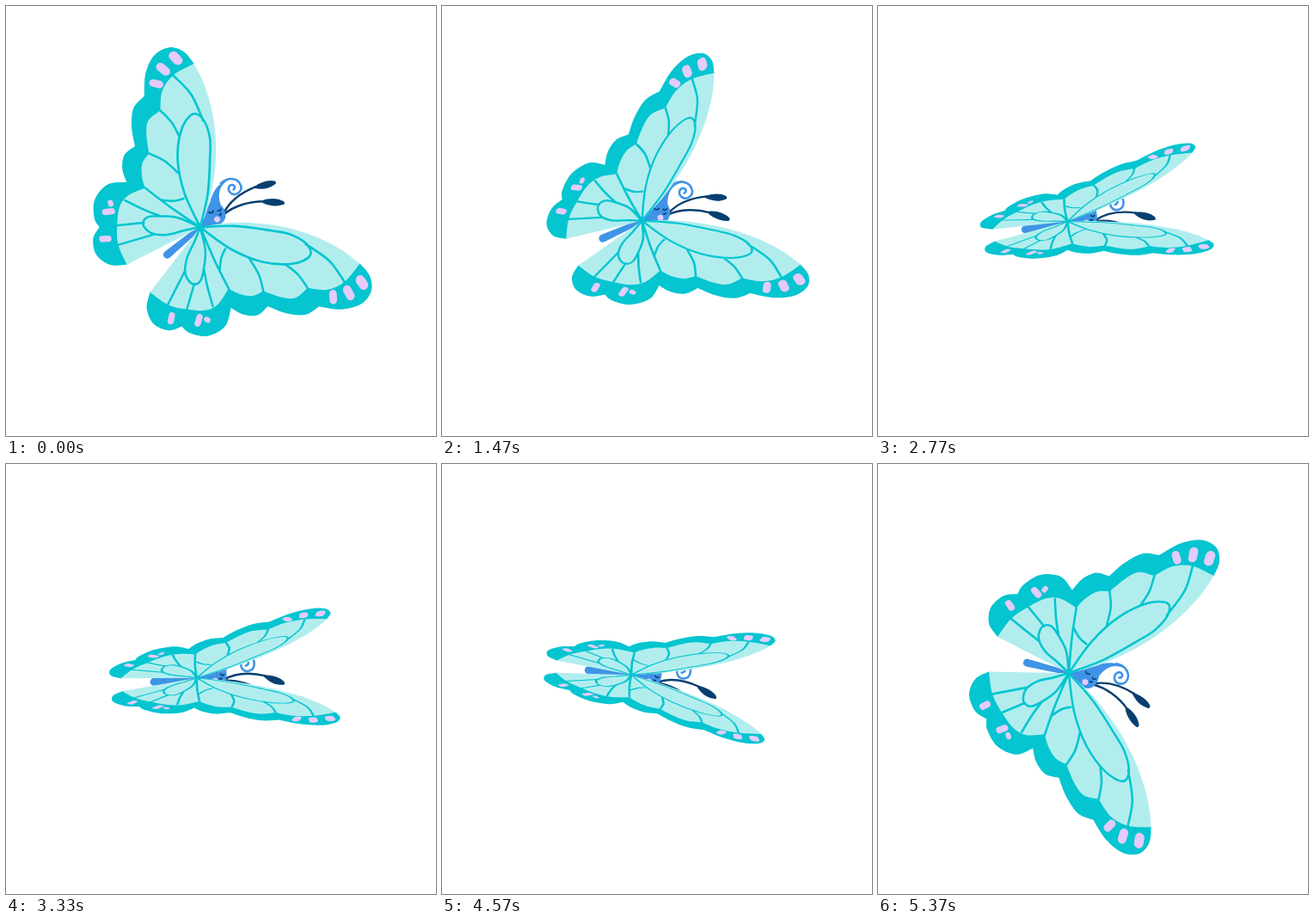
An HTML page for the animation above (5.41 s loop, 500x500 px).

```html
<!DOCTYPE html>
<html lang="en">
<head>
<meta charset="utf-8">
<title>Butterfly</title>
<style>
  html, body { margin: 0; width: 100%; height: 100%; overflow: hidden; background: #fff; }
  svg { display: block; width: 100vw; height: 100vh; }
  .line { fill: none; stroke-linecap: round; stroke-linejoin: round; }
</style>
</head>
<body>
<svg viewBox="0 0 500 500">
  <g id="butterfly">
    <g id="body">
      <g class="line" stroke="#073f70" stroke-width="2.4">
        <path d="M31 5C44 -1 62 -1 80 5"/>
        <path d="M31 6C46 6 63 13 76 24"/>
      </g>
      <g fill="#073f70">
        <path d="M78 4C86 4 97 8 101 14Q102 18 98 17C90 17 83 12 78 6Z"/>
        <path d="M75 22C83 24 92 32 94 39Q94 43 90 41C83 38 77 31 74 25Z"/>
      </g>
      <g fill="#3f94e6">
        <path d="M0 -2.5L-50 -4.5A4.5 4.5 0 0 0 -50 4.5L0 2.5Z"/>
        <path d="M0 -2C12 -4 18 -11 27 -15C38 -23 50 -27 61 -21C50 -24 40 -18 35 -5C36 8 28 14 20 12C12 10 7 5 0 3Z"/>
      </g>
      <path class="line" stroke="#3f94e6" stroke-width="2.6"
        d="M51 -24C62 -25 69 -17 68 -10C67 -1 56 0 53 -7C51 -14 58 -18 61 -13C62 -11 60 -9 58 -9"/>
      <g class="line" stroke="#073f70" stroke-width="1.6">
        <path d="M19 -7Q20 -3 24 -5"/>
        <path d="M28 -2Q29 1 32 -1"/>
        <path d="M26 3Q28 5 29 3"/>
      </g>
      <circle cx="21" cy="5.5" r="3.4" fill="#e3cbfa"/>
    </g>
    <g id="left"></g>
    <g id="right"></g>
  </g>
</svg>
<script>
const LOOP = 5410;
const TEAL = '#04c5d0', PALE = '#b2edee', PINK = '#e3cbfa';
const $ = id => document.getElementById(id);

// Smooth curve through points, continuing a path that stands at the first one.
function through(pts) {
  const at = i => pts[Math.max(0, Math.min(pts.length - 1, i))];
  let d = '';
  for (let i = 0; i < pts.length - 1; i++) {
    const [a, b, c, e] = [at(i - 1), at(i), at(i + 1), at(i + 2)];
    const c1 = [0, 1].map(k => (b[k] + (c[k] - a[k]) / 6).toFixed(1));
    const c2 = [0, 1].map(k => (c[k] - (e[k] - b[k]) / 6).toFixed(1));
    d += `C${c1} ${c2} ${c}`;
  }
  return d;
}
const chain = arcs => arcs.map(through).join('');
const curve = pts => `M${pts[0]}${through(pts)}`;

// Wing coordinates: x runs towards the head, y away from the body.
const tip = [126, 151], heel = [-92, 21];
const border = [
  [tip, [127, 169], [118, 184], [99, 188], [77, 178], [58, 159]],
  [[58, 159], [39, 156], [22, 140], [10, 121]],
  [[10, 121], [-6, 121], [-19, 110], [-26, 95]],
  [[-26, 95], [-44, 107], [-67, 103], [-82, 87], [-85, 75]],
  [[-85, 75], [-100, 69], [-110, 52], [-106, 33], heel]
];
const membrane = [
  [[0, 0], [31, 18], [59, 41], [81, 64], [102, 93], [118, 125], tip],
  [tip, [99, 156], [77, 150], [60, 134]],
  [[60, 134], [42, 134], [29, 123], [16, 104]],
  [[16, 104], [2, 100], [-9, 88], [-15, 76]],
  [[-15, 76], [-36, 82], [-52, 78], [-68, 64], [-83, 46], heel]
];
const veins = [
  [[0, 0], [14, 42], [35, 77], [62, 101], [84, 107], [89, 94], [80, 73], [65, 56], [34, 25], [0, 0]],
  [[88, 93], [99, 126], [99, 156]],
  [[60, 134], [60, 115], [55, 96]],
  [[16, 104], [23, 86], [25, 65]],
  [[-15, 76], [-9, 40], [0, 0]],
  [[-11, 53], [-1, 43], [9, 38]],
  [[0, 0], [-10, 23], [-21, 36], [-36, 48], [-46, 45], [-46, 31], [-34, 18], [-16, 9], [0, 0]],
  [[-42, 80], [-34, 59], [-25, 40]],
  [[-68, 63], [-44, 46]],
  [[-83, 45], [-45, 28]]
];
const spots = [
  [[115, 173], [115, 166], 11],
  [[95, 173], [96, 165], 10],
  [[76, 164], [80, 158], 9],
  [[-56, 89], [-57, 87], 6],
  [[-68, 84], [-62, 80], 7.5],
  [[-92, 62], [-87, 58], 7.5]
];

const wing =
  `<path fill="${TEAL}" d="M${tip}${chain(border)}L-40 22L60 80Z"/>` +
  `<path fill="${PALE}" d="M0 0${chain(membrane)}Z"/>` +
  `<path class="line" stroke="${TEAL}" stroke-width="2.6" d="${veins.map(curve).join('')}"/>` +
  spots.map(([a, b, w]) =>
    `<path class="line" stroke="${PINK}" stroke-width="${w}" d="M${a}L${b}"/>`).join('');
$('left').innerHTML = $('right').innerHTML = wing;

function interpolate(keys, x, ease = u => u) {
  let i = 0;
  while (i < keys.length - 2 && x > keys[i + 1][0]) i++;
  const [[x0, y0], [x1, y1]] = [keys[i], keys[i + 1]];
  return y0 + (y1 - y0) * ease((x - x0) / (x1 - x0));
}
const soft = u => u * u * (3 - 2 * u);

// Wing beats completed over time, and the drift along the body within one beat.
const beats = [[0, -0.04], [670, 1.083], [1470, 2.297], [2770, 4.49],
  [3870, 6.4], [4570, 7.5], [5370, 8.776], [5410, 8.85]];
const drift = [[0, -14.5], [0.083, -11], [0.25, -5.5], [0.3, -6], [0.4, -12],
  [0.5, -18], [0.776, -16.7], [0.96, -15.8], [1, -14.5]];

function draw(t) {
  const beat = interpolate(beats, t);
  const phase = beat - Math.floor(beat);
  const fold = (26 - 45 * Math.cos(2 * Math.PI * phase)) * Math.PI / 180;
  const shear = 0.22 * Math.sin(fold);
  const span = 1.05 * Math.cos(fold);
  const turn = -39.7 + t / 100 + 1.3 * Math.sin(Math.PI * t / LOOP) ** 2;
  const shift = interpolate(drift, phase, soft);

  $('butterfly').setAttribute('transform',
    `translate(238 247.2) rotate(${turn}) translate(${shift} 0)`);
  $('left').setAttribute('transform', `matrix(1 0 ${shear} ${-span} 0 0)`);
  $('right').setAttribute('transform', `matrix(1 0 ${shear} ${span} 0 0)`);
}

const start = performance.now();
function tick() {
  draw((performance.now() - start) % LOOP);
  requestAnimationFrame(tick);
}
tick();
</script>
</body>
</html>
```
